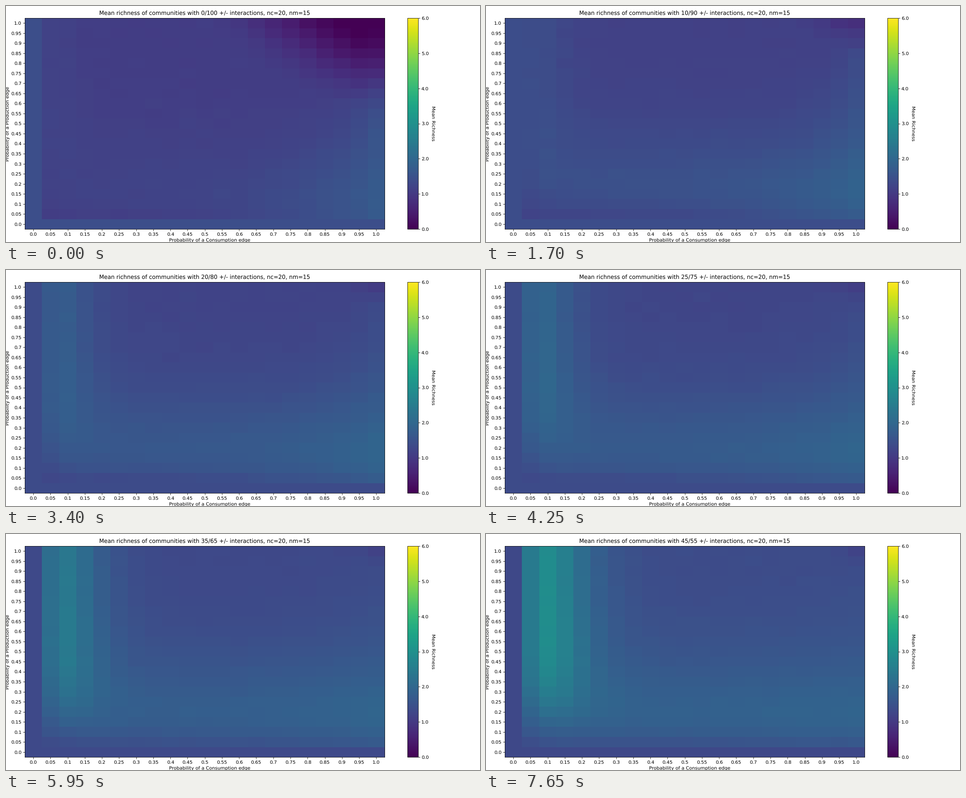
Animation of 1058x529 px, one loop 8 s. Source, as a matplotlib script:

```python
import numpy as np
import matplotlib.pyplot as plt
from matplotlib.animation import FuncAnimation

WIDTH, HEIGHT = 1058, 529
LOOP_MS, STEP_MS, TICK_MS = 8000, 850, 50
N = 21
STEPS = -(-LOOP_MS // STEP_MS)

plt.rcParams.update({"font.family": "DejaVu Sans", "font.size": 10,
                     "text.hinting": "none"})

prob = np.arange(N) / (N - 1)
C, P = np.meshgrid(prob, prob)  # consumption along x, production along y


def hump(x, peak, power):
    """Rises from 0 to 1 at the peak, then decays."""
    return (x / peak * np.exp(1 - x / peak)) ** power


def smoothstep(x):
    x = np.clip(x, 0, 1)
    return x * x * (3 - 2 * x)


def saturate(x):
    return 1 - np.exp(-x)


def richness(share):
    """Mean richness on the grid for a percentage of positive interactions."""
    u = share / 45
    base = 1.08 + 0.27 * u

    # Low production: a horizontal belt
    belt = (0.12 + 0.38 * saturate(share / 12)) * hump(P, 0.2, 1.5)
    belt *= saturate(C / 0.08)

    # Low consumption: a vertical ridge that grows with the share
    ridge = (0.1 + 1.45 * u ** 1.4) * hump(C, 0.06 + 0.035 * u, 2)
    ridge *= saturate((P / 0.32) ** 2)

    # High consumption: a rise towards the right edge
    rise = (0.58 - 0.47 * u) * (1 - 0.7 * P)
    rise *= C ** (3 + 30 * P ** 2 * (1 - u))

    # High on both: communities collapse, less so as the share grows
    collapse = C * P - 0.38 * saturate(share / 7)
    collapse = 1.25 * smoothstep((collapse - 0.5) / 0.5)

    field = base + belt + ridge + rise - collapse
    field += np.random.default_rng(share).normal(0, 0.01, field.shape)
    field[0, :] = field[:, 0] = 1.44 - 0.14 * u
    return field.clip(0, 6)


def box(left, top, right, bottom):
    return [left / WIDTH, 1 - bottom / HEIGHT,
            (right - left) / WIDTH, (bottom - top) / HEIGHT]


def label(x, y, text, rotation=0):
    fig.text(x / WIDTH, 1 - y / HEIGHT, text, rotation=rotation,
             ha="center", va="center")


fig = plt.figure(figsize=(14, 7), dpi=WIDTH / 14, facecolor="white")
ax = fig.add_axes(box(42, 27, 845.4, 500))
fields = [richness(5 * step) for step in range(STEPS)]
heat = ax.imshow(fields[0], cmap="viridis", vmin=0, vmax=6, origin="lower",
                 aspect="auto", interpolation="nearest")
names = [str(p) for p in prob]
ax.set_xticks(range(N), names)
ax.set_yticks(range(N), names)
title = ax.set_title("")

fig.colorbar(heat, cax=fig.add_axes(box(896, 27, 919.6, 500)),
             ticks=range(7), format="%.1f")

label(455, 525.6, "Probability of a Consumption edge")
label(4.2, 264.5, "Probability of a Production edge", 90)
label(953, 263.5, "Mean Richness", 270)


def update(frame):
    step = min(frame * TICK_MS // STEP_MS, STEPS - 1)
    share = 5 * step
    heat.set_data(fields[step])
    title.set_text(f"Mean richness of communities with {share}/{100 - share} "
                   "+/- interactions, nc=20, nm=15")
    return heat, title


anim = FuncAnimation(fig, update, frames=LOOP_MS // TICK_MS, interval=TICK_MS,
                     init_func=lambda: update(0), repeat=True, repeat_delay=0)
plt.show()
```
